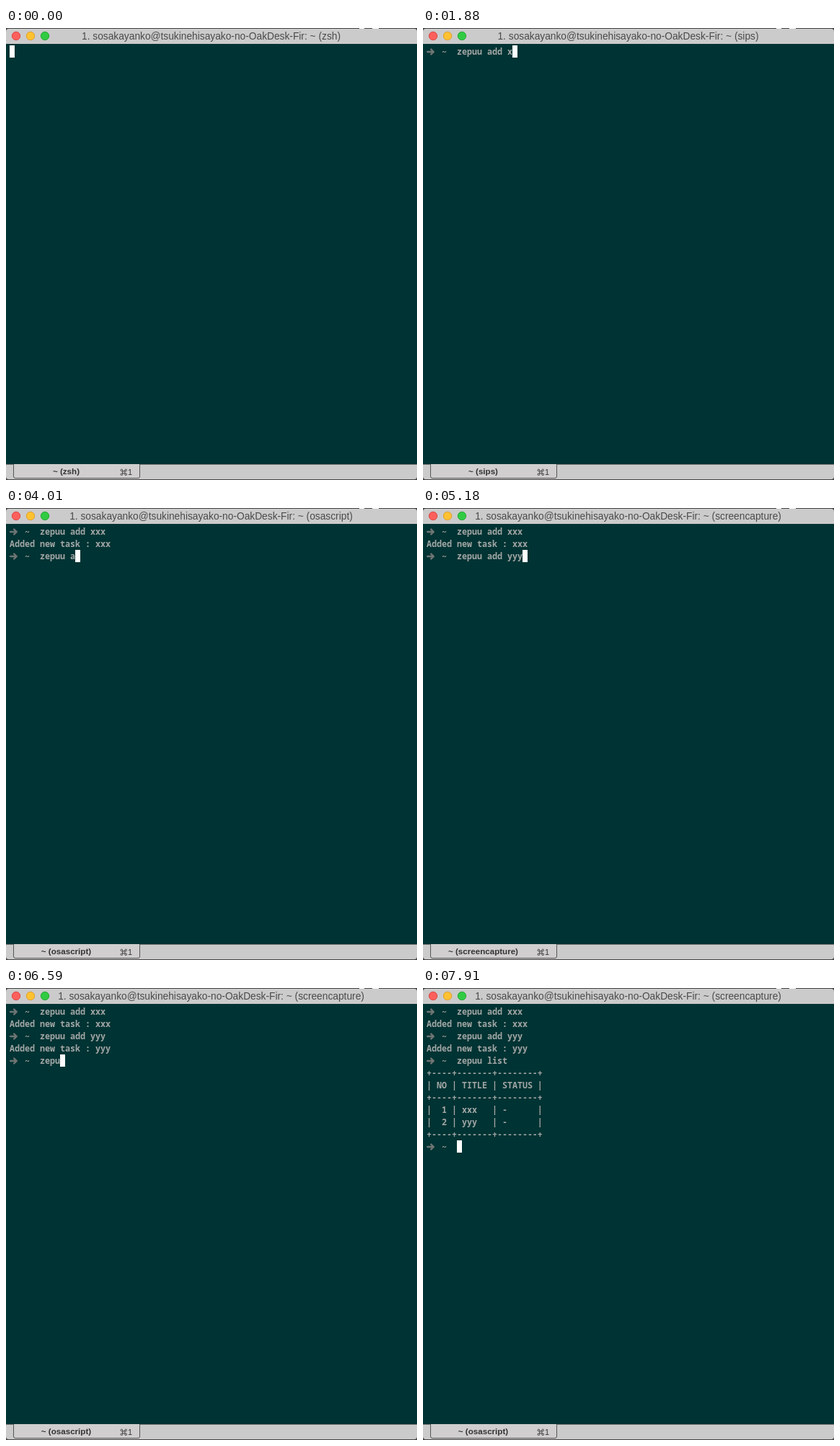
Animation of 570x626 px, one loop 8 s. Source, as an HTML page:

```html
<!DOCTYPE html>
<html lang="en">
<head>
<meta charset="utf-8">
<title>Terminal session</title>
<style>
  html, body { margin: 0; width: 100%; height: 100%; overflow: hidden; background: #333; }
  svg { display: block; width: 570px; height: 626px; }
  text { white-space: pre; }
  .ui { font-family: "Liberation Sans", Arial, sans-serif; }
  .title { font-size: 13.75px; fill: #4a4a4a; text-anchor: middle; }
  .tab { font-size: 11.6px; font-weight: bold; fill: #333; text-anchor: middle; }
  .row { font: 600 11.667px "Noto Sans Mono", "DejaVu Sans Mono", monospace; fill: #a3a7a6; }
  .arrow { fill: none; stroke: #6f7573; stroke-width: 2.4; stroke-linecap: round; stroke-linejoin: round; }
</style>
</head>
<body>
<svg id="stage" viewBox="0 0 570 626">
  <rect width="570" height="626" fill="#444"/>
  <rect y="1" width="570" height="624" rx="4" fill="#cccbcc"/>
  <rect y="22" width="570" height="582" fill="#003333"/>
  <path d="M490 .5h7M508 .5h9" stroke="#fff"/>
  <g stroke-width="1">
    <circle cx="14" cy="11" r="5.7" fill="#fc605c" stroke="#de4643"/>
    <circle cx="34" cy="11" r="5.7" fill="#fdc231" stroke="#dda02c"/>
    <circle cx="54" cy="11" r="5.7" fill="#30cb43" stroke="#27a935"/>
  </g>
  <text id="title" class="ui title" x="284.5" y="16"></text>
  <g id="screen"></g>
  <rect id="cursor" width="7" height="17" fill="#fff"/>
  <path d="M0 604.5H570" stroke="#777"/>
  <path d="M10.5 604V621q0 2.5 2.5 2.5H183q2.5 0 2.5-2.5V604" fill="#d0cecf" stroke="#555"/>
  <text id="tab" class="ui tab" x="83.5" y="618"></text>
  <g fill="none" stroke="#333" stroke-width=".9">
    <path d="M161.7 613.7h3.2v3.2h-3.2z"/>
    <circle cx="160.4" cy="612.4" r="1.3"/><circle cx="166.2" cy="612.4" r="1.3"/>
    <circle cx="160.4" cy="618.2" r="1.3"/><circle cx="166.2" cy="618.2" r="1.3"/>
  </g>
  <text class="ui" x="169" y="619" font-size="11" fill="#333">1</text>
</svg>
<script>
const LOOP = 8000, CELL = 7, LINE = 17, LEFT = 5, TOP = 24, ROWS = 12;
const HOST = "sosakayanko@tsukinehisayako-no-OakDesk-Fir";
const PROMPT = "➜  ~  ";
const TABLE = (() => {
  const rule = "+----+-------+--------+";
  return [rule, "| NO | TITLE | STATUS |", rule,
    "|  1 | xxx   | -      |", "|  2 | yyy   | -      |", rule, ""].join("\n");
})();

// Terminal output as [time, text] pieces.
const output = [[100, PROMPT]];
const type = (text, times) => times.forEach((time, i) => output.push([time, text[i]]));
const run = (start, mid, end, result) =>
  output.push([start, "\n"], [mid, result], [end, PROMPT]);

type("zepuu add xxx", [530, 640, 750, 860, 970, 1080, 1270, 1390, 1550, 1670, 1880, 2050, 2210]);
run(2610, 2710, 2810, "Added new task : xxx\n");
type("zepuu add yyy", [3260, 3390, 3490, 3590, 3730, 3820, 4010, 4130, 4320, 4560, 4820, 5020, 5180]);
run(5580, 5680, 5780, "Added new task : yyy\n");
type("zepuu list", [6250, 6370, 6480, 6590, 6730, 6830, 6980, 7170, 7250, 7340]);
run(7790, 7850, 7910, TABLE);

// The running job's name; the window title lags behind the tab.
const tabJobs = [[0, "zsh"], [640, "sips"], [1270, "screencapture"], [1670, "sips"],
  [2210, "screencapture"], [2710, "osascript"], [3490, "sips"], [3820, "osascript"],
  [4320, "sips"], [5020, "screencapture"], [5680, "sips"], [6250, "screencapture"],
  [6590, "osascript"], [6980, "screencapture"], [7790, "osascript"]];
const titleJobs = [[0, "zsh"], [860, "sips"], [1390, "screencapture"], [1880, "sips"],
  [2610, "screencapture"], [3260, "osascript"], [3590, "sips"], [4010, "osascript"],
  [4560, "sips"], [5180, "screencapture"], [5780, "sips"], [6480, "screencapture"],
  [6730, "osascript"], [7170, "screencapture"]];

const byId = id => document.getElementById(id);
const add = (tag, attrs) => {
  const node = document.createElementNS("http://www.w3.org/2000/svg", tag);
  for (const key in attrs) node.setAttribute(key, attrs[key]);
  return byId("screen").appendChild(node);
};
const rows = Array.from({ length: ROWS }, (_, i) => {
  const y = TOP + i * LINE;
  return {
    text: add("text", { class: "row", x: LEFT, y: y + 13 }),
    arrow: add("path", { class: "arrow", d: `M6.2 ${y + 9}H14.5M11.2 ${y + 5.6}L14.8 ${y + 9}L11.2 ${y + 12.4}` })
  };
});

const until = (list, t) => list.filter(([time]) => time <= t);
const current = (list, t) => until(list, t).pop()[1];
const setText = (node, value) => { if (node.textContent !== value) node.textContent = value; };

function draw(t) {
  const lines = until(output, t).map(piece => piece[1]).join("").split("\n");
  rows.forEach(({ text, arrow }, i) => {
    const line = lines[i] || "";
    setText(text, line.replace("➜", " "));
    arrow.setAttribute("visibility", line.startsWith("➜") ? "visible" : "hidden");
  });
  const last = lines.length - 1;
  byId("cursor").setAttribute("x", LEFT + lines[last].length * CELL);
  byId("cursor").setAttribute("y", TOP + last * LINE);
  setText(byId("title"), `1. ${HOST}: ~ (${current(titleJobs, t)})`);
  setText(byId("tab"), `~ (${current(tabJobs, t)})`);
}

const start = performance.now();
function tick() {
  draw((performance.now() - start) % LOOP);
  requestAnimationFrame(tick);
}
tick();
</script>
</body>
</html>
```
